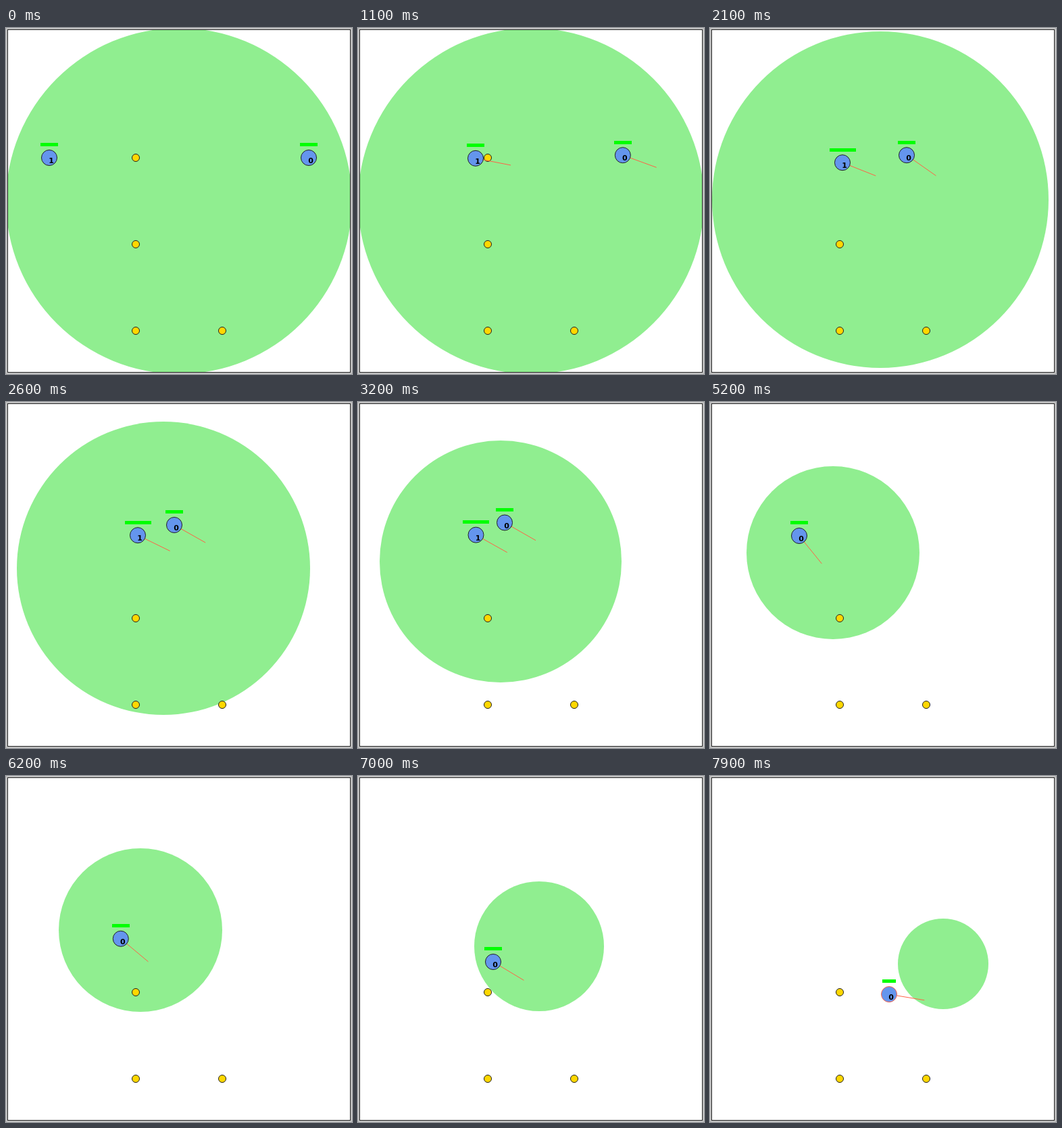
Write an HTML page with a canvas that moves like this. It is 512x512 px and loops after 8 s.

```html
<!DOCTYPE html>
<html lang="en">
<head>
<meta charset="utf-8">
<title>Shrinking zone</title>
<style>
html, body { margin: 0; overflow: hidden; background: #fff; }
canvas { display: block; }
</style>
</head>
<body>
<canvas id="stage" width="512" height="512"></canvas>
<script>
const ctx = document.getElementById('stage').getContext('2d');
const TICK = 100, TICKS = 80;
const HIT = '#ff6347', INK = '#222';
const RADIUS = 12, PICKUP_RADIUS = 6, AIM = 53;

// Way points: tick, x, y, heading in degrees.
const players = [
  { name: '1', diesAt: 46, path: [[0, 64, 192, 0], [13, 194, 193, 13],
    [21, 196, 199.2, 21.6], [26, 195, 197.2, 26], [38, 154, 196.2, 32.5], [46, 135, 205, 36]] },
  { name: '0', diesAt: TICKS, path: [[0, 448, 192, 0], [9, 412, 188.2, 17],
    [21, 291, 188.2, 35], [26, 249, 182, 29.5], [38, 185, 175, 30],
    [52, 132, 198, 51], [70, 200, 275, 31], [79, 265, 323, 9.5]] }
];
const pickups = [[192, 192], [192, 320], [192, 448], [320, 448]].map(([x, y]) => ({ x, y }));

const clamp01 = v => Math.max(0, Math.min(1, v));

function pose(player, n) {
  const { path } = player;
  const i = Math.max(1, path.findIndex(k => k[0] >= n));
  const a = path[i - 1], b = path[i];
  const p = (n - a[0]) / (b[0] - a[0]);
  const [, x, y, deg] = a.map((v, j) => v + (b[j] - v) * p);
  return { x, y, angle: deg * Math.PI / 180 };
}

// The zone halves twice, drifting to a new centre each time.
function zone(n) {
  const p = clamp01((n - 20) / 20), q = clamp01((n - 60) / 20);
  return {
    x: Math.floor(256 - 74 * p + 172 * q),
    y: Math.floor(256 - 33 * p + 58 * q),
    r: Math.floor(256 - 128 * p - 64 * q)
  };
}

const distance = (a, b) => Math.hypot(a.x - b.x, a.y - b.y);

function isOutside(player, n) {
  const z = zone(n);
  return distance(pose(player, n), z) > z.r;
}

// Play the match once: pickups heal, ticks outside the zone hurt.
for (const p of players) {
  p.health = [];
  for (let n = 0, hp = 100; n < p.diesAt; n++) {
    for (const item of pickups) {
      if (item.takenAt === undefined && distance(pose(p, n), item) < RADIUS + PICKUP_RADIUS) {
        item.takenAt = n;
        hp += 50;
      }
    }
    if (isOutside(p, n)) hp -= 5;
    p.health[n] = hp;
  }
}

function disc(x, y, r, fill, stroke) {
  ctx.beginPath();
  ctx.arc(x, y, r, 0, 2 * Math.PI);
  ctx.fillStyle = fill;
  ctx.fill();
  if (!stroke) return;
  ctx.strokeStyle = stroke;
  ctx.stroke();
}

function drawPlayer(p, n) {
  const { x, y, angle } = pose(p, n);
  if (n > 0) {
    ctx.beginPath();
    ctx.moveTo(x, y);
    ctx.lineTo(x + AIM * Math.cos(angle), y + AIM * Math.sin(angle));
    ctx.strokeStyle = HIT;
    ctx.stroke();
  }
  disc(x, y, RADIUS - 0.5, '#6495ed', isOutside(p, n) ? HIT : INK);
  const width = Math.round(p.health[n] * 0.26);
  ctx.fillStyle = '#0f0';
  ctx.fillRect(Math.round(x - width / 2), Math.round(y - 21.6), width, 5);
  ctx.fillStyle = '#000';
  ctx.fillText(p.name, x + 3, y + 8);
}

function frame(inset, width, color) {
  ctx.strokeStyle = color;
  ctx.lineWidth = width;
  ctx.strokeRect(inset, inset, 512 - 2 * inset, 512 - 2 * inset);
}

function draw(n) {
  ctx.fillStyle = '#fff';
  ctx.fillRect(0, 0, 512, 512);
  ctx.lineWidth = 1;
  ctx.font = 'bold 11px "DejaVu Sans", sans-serif';
  ctx.textAlign = 'center';

  const z = zone(n);
  disc(z.x, z.y, z.r, '#90ee90');
  for (const { x, y, takenAt = TICKS } of pickups)
    if (n < takenAt) disc(x, y, PICKUP_RADIUS - 0.5, '#ffd700', INK);
  for (const p of players)
    if (n < p.diesAt) drawPlayer(p, n);

  frame(1, 2, '#c0c0c0');
  frame(2.5, 1, INK);
}

let start;
function loop(now) {
  start ??= now;
  draw(Math.floor(Math.max(0, now - start) / TICK) % TICKS);
  requestAnimationFrame(loop);
}
draw(0);
requestAnimationFrame(loop);
</script>
</body>
</html>
```
